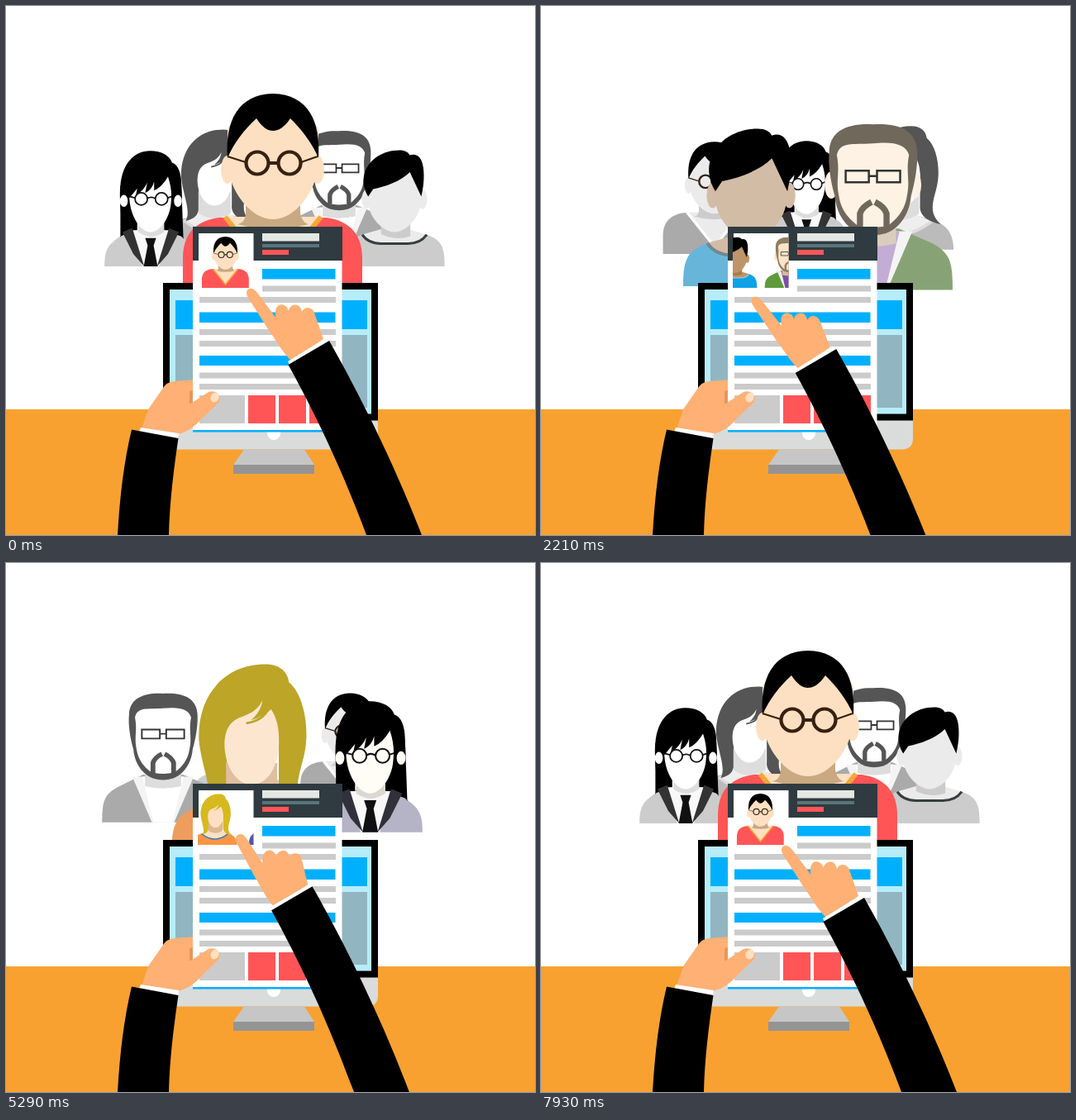
An HTML page that plays this animation: 640x640 px, repeating every 8.43 s.

```html
<!DOCTYPE html>
<html lang="en">
<head>
<meta charset="utf-8">
<title>Choosing a candidate</title>
<style>
html, body { margin: 0; width: 100%; height: 100%; overflow: hidden; background: #fff; }
svg { display: block; width: 100vw; height: 100vh; }
</style>
</head>
<body>
<svg id="stage" viewBox="0 0 640 640">
  <rect width="640" height="640" fill="#fff"/>
  <rect y="488" width="640" height="152" fill="#f8a131"/>
  <g id="crowd"></g>

  <g id="monitor">
    <path d="M190 500H450V523Q450 536.500 436 536.500H204Q190 536.500 190 523Z" fill="#d9dcdb"/>
    <path d="M190 335H450V501.500H190Z"/>
    <path d="M198 343H442V493.500H198Z" fill="#b7ecf9"/>
    <path d="M205 356H437V391H205Z" fill="#00b0ff"/>
    <path d="M205 398H437V486H205Z" fill="#91b6c2"/>
    <path d="M316 515H332V517A8 8 0 0 1 316 517Z" fill="#fff"/>
    <path d="M288 536.500H361L373 555H275Z" fill="#c6c6c6"/>
    <path d="M275 555H373V566H275Z" fill="#949494"/>
  </g>

  <path d="M164 512L172 488L188 465Q194 454 204 454L230 452V500L207 518Z" fill="#ffb074"/>
  <g id="paper"></g>
  <clipPath id="photo"><rect x="232" y="275" width="67.500" height="66"/></clipPath>
  <g id="thumbs" clip-path="url(#photo)"></g>

  <g id="left">
    <path d="M222 466L226 465V482L222 481Z" fill="#e8965c"/>
    <path d="M222 482L245 467C255 464 262 472 257 480L238 498Q224 515 207 518L198 500Z" fill="#ffb074"/>
    <ellipse cx="252.500" cy="473.500" rx="5" ry="6" transform="rotate(25 252.5 473.5)" fill="#fee0c0"/>
    <path d="M163 510L209 517L208 524L161 515Z" fill="#fff"/>
    <path d="M152 512.500L208.500 523C203 560 198 600 197 640H135C138 590 143 550 152 512.500Z"/>
  </g>

  <g id="arm">
    <g id="hand">
      <path d="M292 343.500C296 340 300 342 304 347L326.500 377C324 366 329 360 335 361.500C340 363 341 366 341.500 369C344 361 351 360 355 363.500C357 366 357.500 368 358 370C361 363 370 363.500 373 371L384 403L346 430C335 420 328 406 319 394L293 353Q289.500 347 292 343.500Z" fill="#ffb074"/>
      <path d="M341 430L387 401.500L392 408L344 436Z" fill="#fff"/>
    </g>
    <path d="M341.500 434L391 405C428 470 470 555 503 640L528 705H462L436 640C410 570 378 500 341.500 434Z"/>
  </g>
</svg>
<script>
const NS = 'http://www.w3.org/2000/svg';
const $ = id => document.getElementById(id);
const add = (parent, tag, attrs = {}) => {
  const el = document.createElementNS(NS, tag);
  for (const k in attrs) el.setAttribute(k, attrs[k]);
  return parent.appendChild(el);
};
const oval = (x, y, rx, ry = rx) =>
  `M${x - rx} ${y}a${rx} ${ry} 0 1 0 ${2 * rx} 0a${rx} ${ry} 0 1 0 ${-2 * rx} 0Z`;
const ears = (l, r, y, rx, ry) => oval(l, y, rx, ry) + oval(r, y, rx, ry);

// Paper contents: x, y, width, height, colour
const grey = '#cbcbcb', blue = '#00b0ff', red = '#ff5557';
const boxes = [
  [226, 267, 180.5, 248, '#fff'], [226, 267, 181, 41, '#2f3b40'], [233, 275, 66.5, 66, '#fff'],
  [310, 275, 69, 9.5, '#e4e8e3'], [310, 288, 69, 4, '#58757a'], [310, 295, 32, 6, red],
  [310, 318, 88.5, 12.5, blue], [310, 338.500, 89, 7, grey],
  [234, 370.500, 164.5, 12.5, blue], [234, 423, 164.5, 12, blue],
  [234, 471, 55, 34, grey], [226, 513, 180, 2.5, blue]
];
for (const y of [352, 391, 405, 443.5, 457]) boxes.push([234, y, 165, 7, grey]);
for (const x of [293, 330, 367]) boxes.push([x, 471, x > 360 ? 32 : 33, 34, red]);
for (const [x, y, width, height, fill] of boxes) add($('paper'), 'rect', { x, y, width, height, fill });

// Each part: path, colour in front, colour behind, optional line width
const people = [
  [ // red jersey
    ['M214 343V305C214 277 228 260 258 256H388C416 260 431 277 431 305V343Z', '#ff5557', '#aaaaaa'],
    ['M266 255L323 328L380 255Z', '#fde0c2', '#ebebeb'],
    ['M265 255L323 328L381 255', '#f9a637', '#ffffff', 6],
    ['M290 235H356V250Q358 262 366 264Q323 276 280 264Q290 262 290 250Z', '#c9a981', '#cccccc'],
    [ears(268, 377, 198, 8, 17), '#fde0c2', '#ebebeb'],
    ['M268 150V190C270 224 296 258 323 258C350 258 376 224 378 190V150C370 120 276 120 268 150Z', '#fde0c2', '#ebebeb'],
    ['M268 184C265 140 280 107 323 106C366 107 381 140 378 184C370 165 358 150 344 136C337 147 329 151 323 151S310 147 303 136C288 150 276 165 268 184Z', '#000000', '#000000'],
    [oval(304, 190, 13.5) + oval(343, 190, 13.5) + 'M318 190H329', '#37200f', '#37200f', 4.2],
    ['M290 189L268 182M357 189L377 182', '#37200f', '#37200f', 2.2]
  ],
  [ // blue shirt
    ['M222 343C222 300 230 290 258 279L290 275H356L388 279C416 290 424 300 424 343Z', '#0fa2e6', '#cccccc'],
    ['M258 279Q270 297 296 297H350Q376 297 388 279L350 268H296Z', '#bf9468', '#ebebeb'],
    ['M296 255H355V282Q325 292 296 278Z', '#a97c50', '#cccccc'],
    ['M258 279Q270 297 296 297H350Q376 297 388 279', '#a5c8da', '#363e42', 5],
    [ears(266, 380, 208, 9, 19), '#bf9468', '#ebebeb'],
    ['M270 170V215C272 245 300 274 323 274S374 245 376 215V150L354 135Z', '#bf9468', '#ebebeb'],
    ['M270 202C262 190 258 172 262 158C270 127 300 109 333 109C344 109 351 113 354 119C366 114 378 121 381 143C384 165 381 185 377 202L354 153C335 172 305 182 280 187Z', '#000000', '#000000']
  ],
  [ // green jacket
    ['M208 352C208 312 212 300 237 286L285 262H361L411 284C436 298 440 310 440 352Z', '#5f9b3a', '#aaaaaa'],
    ['M265 266L381 266L344 352H302Z', '#f4f4f4', '#f4f4f4'],
    ['M284 266H362L341 352H305Z', '#7b4fa5', '#ffffff'],
    ['M289 245H357V284Q323 292 289 284Z', '#d9bb98', '#dddddd'],
    [ears(262, 384, 198, 10, 20), '#fde3c8', '#ffffff'],
    ['M267 214C260 190 257 165 259 148C260 119 285 107 323 109C361 107 386 117 388 148C389 165 386 190 379 214C377 240 362 262 342 269Q323 275 304 269C284 262 269 240 267 214Z', '#8f7e61', '#555555'],
    ['M270 154C275 134 292 139 323 137C354 134 371 138 376 154C371 180 378 190 373 214C370 235 358 248 346 257Q323 264 300 257C288 248 276 235 273 214C268 190 275 180 270 154Z', '#fde3c8', '#ffffff'],
    ['M304 259V240Q307 230 321 223M326 223Q340 230 343 240V259', '#8f7e61', '#555555', 9],
    ['M283 177H317V194H283ZM329 177H363V194H329ZM317 185H329', '#33302c', '#333333', 3]
  ],
  [ // orange top
    ['M224 347C224 314 230 302 258 291L300 280H352L388 290C412 300 426 312 427 347Z', '#fb9546', '#bbbbbb'],
    ['M264 292Q323 340 384 292L350 278H296Z', '#fde0c4', '#eeeeee'],
    ['M264 293Q323 340 384 293', '#3b7fb5', '#dddddd', 6],
    ['M268 294C280 275 262 240 259 205C257 150 290 108 345 108C360 108 373 115 375 131C392 145 400 180 397 210C394 245 372 270 402 298C375 292 360 280 362 262V200H295V262C296 280 288 290 268 294Z', '#d6b91c', '#555555'],
    ['M294 235H360V278Q326 300 294 278Z', '#e0b78f', '#dddddd'],
    ['M292 210C293 190 300 180 316 175C330 170 337 163 341 154C339 168 332 175 326 180C340 176 346 171 352 166C360 178 363 192 362 214C360 245 345 263 327 263S292 242 292 210Z', '#fde0c4', '#ffffff'],
    ['M320 184Q346 180 352 157', '#d6b91c', '#555555', 3]
  ],
  [ // purple jacket
    ['M262 290C268 250 258 215 262 180C266 135 290 110 322 110C345 110 362 120 366 134C380 138 386 160 385 185C388 220 380 260 390 291L350 296V230H296V296Z', '#000000', '#000000'],
    ['M230 343C230 310 236 300 262 282L296 270H350L384 282C410 300 416 310 416 343Z', '#5752ac', '#cccccc'],
    ['M285 270H361L340 343H306Z', '#f8f8f8', '#f8f8f8'],
    ['M266 274L286 266L310 343L288 318ZM380 274L360 266L336 343L358 318Z', '#28245c', '#333333'],
    ['M298 250H350V274Q324 292 298 274Z', '#d9c4a0', '#dddddd'],
    ['M312 286H334L329 301L337 343H309L317 301Z', '#101018', '#101010'],
    ['M262 180V285L280 240V180ZM385 180L389 288L366 240V180Z', '#000000', '#000000'],
    [ears(269, 378, 211, 8, 12), '#fff4d4', '#ffffff'],
    ['M280 205L296 186L293 200Q310 190 316 174L312 195Q326 188 330 172L330 190Q345 184 358 162C364 180 366 195 364 215C362 245 342 274 323 274S282 245 280 205Z', '#fff4d4', '#ffffff'],
    [oval(304, 207, 12.5) + oval(345, 207, 12.5) + 'M316.500 206Q324 201 332 206M291.500 205L280 202M357.500 205L366 202', '#111111', '#111111', 3]
  ]
];
// How large each person stays away from the front
const farSize = [1, 1, 1.09, 1.1, 1];

const rgb = c => [1, 3, 5].map(i => parseInt(c.slice(i, i + 2), 16));
const lerp = (a, b, f) => a + (b - a) * f;
const mix = (a, b, f) => `rgb(${a.map((v, i) => Math.round(lerp(v, b[i], f)))})`;
const mod = (a, n) => ((a % n) + n) % n;

function makePerson(parent, parts) {
  const g = add(parent, 'g');
  const items = parts.map(([d, front, back, line]) => {
    const el = add(g, 'path', { d, fill: 'none' });
    if (line) el.setAttribute('stroke-width', line);
    return { el, prop: line ? 'stroke' : 'fill', front: rgb(front), back: rgb(back) };
  });
  return {
    g,
    place: (x, y, s) => g.setAttribute('transform', `translate(${x} ${y}) scale(${s}) translate(-323 -343)`),
    tint: w => items.forEach(i => i.el.setAttribute(i.prop, mix(i.back, i.front, w)))
  };
}
const figures = people.map(p => makePerson($('crowd'), p));
const thumbs = people.map(p => makePerson($('thumbs'), p));
thumbs.forEach(t => t.tint(1));

// Ring of places: x, base, scale, depth, bow of the path to the next place
const slots = [
  [323, 343, 1, 4, 9], [175, 315, 0.6, 2, -3], [250, 289, 0.54, 0, 0],
  [403, 289, 0.54, 0.5, -9], [470, 315, 0.6, 2.5, 8]
];
// Arm over one swipe: ms, dx, dy, lean of the hand in degrees
const swipe = [
  [0, 0, 0, 0], [150, -15, -20, 8], [340, -27, -6, 3], [545, -34, 10, -2],
  [788, -20, 11, -5], [950, -12, 7, -2], [1080, -6, 3, -1], [1180, 0, 0, 0]
];
const starts = [0, 1665, 3350, 5050, 6750];
const LOOP = 8430, MOVE = 1180, STEP = 8000 / 112, LAST = 7930;

function armAt(ms) {
  let i = 0;
  while (i < swipe.length - 2 && swipe[i + 1][0] <= ms) i++;
  const a = swipe[i], b = swipe[i + 1];
  const f = Math.min(1, (ms - a[0]) / (b[0] - a[0]));
  return a.map((v, n) => lerp(v, b[n], f));
}

function draw(time) {
  const t = Math.min(LAST, Math.floor((time + 5) / STEP) * STEP);
  const turn = starts.filter(s => s <= t).length - 1;
  const ms = t >= LAST - 5 ? MOVE : t - starts[turn];
  const total = turn + Math.min(1, ms / MOVE);

  const order = figures.map((fig, k) => {
    const q = mod(total - k, 5), i = Math.floor(q), f = q - i;
    const a = slots[i], b = slots[(i + 1) % 5];
    const [x, y, s, depth] = a.map((v, n) => lerp(v, b[n], f));
    const front = i === 0 ? 1 - f : i === 4 ? f : 0;
    fig.place(x, y + 4 * f * (1 - f) * a[4], s * lerp(farSize[k], 1, front));
    fig.tint(front);
    thumbs[k].place(265.5 + 66 * (mod(k - total + 2.5, 5) - 2.5), 341, 0.262);
    return { g: fig.g, depth };
  });
  order.sort((a, b) => a.depth - b.depth).forEach(o => $('crowd').appendChild(o.g));

  const [, dx, dy, lean] = armAt(ms);
  $('arm').setAttribute('transform', `translate(${dx} ${dy})`);
  $('hand').setAttribute('transform', `translate(367 420) skewX(${-lean}) translate(-367 -420)`);
}

const begin = performance.now();
function tick() {
  draw((performance.now() - begin) % LOOP);
  requestAnimationFrame(tick);
}
tick();
</script>
</body>
</html>
```
